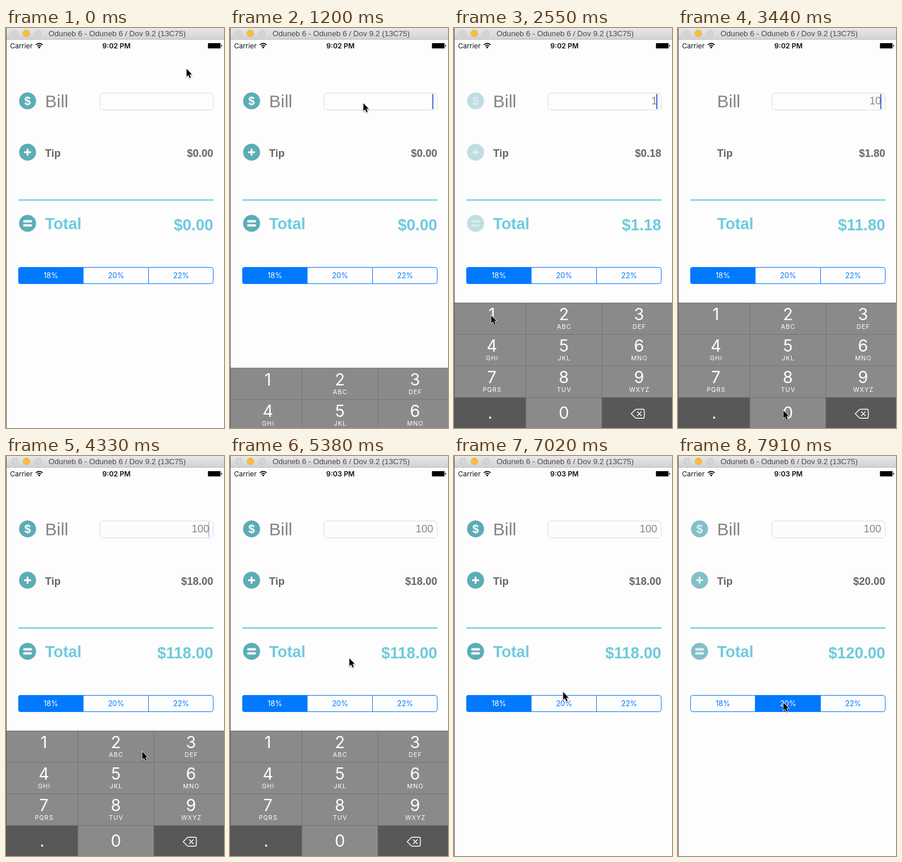
An HTML page with a canvas for the animation above (8 s loop, 374 by 686 pixels).

```html
<!DOCTYPE html>
<html lang="en">
<head>
<meta charset="utf-8">
<title>Tip calculator</title>
<style>
html, body { margin: 0; width: 374px; height: 686px; overflow: hidden; }
canvas { display: block; }
</style>
</head>
<body>
<canvas id="stage" width="374" height="686"></canvas>
<script>
const ctx = document.getElementById('stage').getContext('2d');
const UI = 'Inter, Roboto, sans-serif';
const HELV = '"Liberation Sans", Arial, sans-serif';
const BLUE = '#0079ff', TEAL = '#5dadb6', AQUA = '#6dcbdc';

// The screen refreshes in even steps; every moment below is a step number.
const LOOP = 8000, STEP = 149.2;
const SHOW = 7, HIDE = 37, NEXT_MINUTE = 31;

const home = { x: 309, y: 69 };
const moves = [
  { from: 0, to: 4, x: 228, y: 128 },
  { from: 8, to: 12, x: 95, y: 467 },
  { from: 12, to: 14, x: 63, y: 492 },
  { from: 18, to: 21, x: 180, y: 655 },
  { from: 26, to: 29, x: 233, y: 506 },
  { from: 29, to: 33, x: 204, y: 346 },
  { from: 40, to: 44, x: 284, y: 131 },
  { from: 44, to: 48, x: 180, y: 422 }
];
const edits = [
  { at: -9, bill: '', choice: 0 },
  { at: 16, bill: '1', choice: 0 },
  { at: 23, bill: '10', choice: 0 },
  { at: 26, bill: '100', choice: 0 },
  { at: 51, bill: '100', choice: 1 }
];
const rates = [18, 20, 22];
const letters = ['', 'ABC', 'DEF', 'GHI', 'JKL', 'MNO', 'PQRS', 'TUV', 'WXYZ'];

const clamp = v => Math.max(0, Math.min(1, v));
const easeOut = v => 1 - (1 - clamp(v)) ** 2;

function rect(x, y, w, h, color) {
  ctx.fillStyle = color;
  ctx.fillRect(x, y, w, h);
}

function text(str, x, y, font, color, align = 'left', spacing = 0) {
  ctx.font = font;
  ctx.fillStyle = color;
  ctx.textAlign = align;
  ctx.letterSpacing = spacing + 'px';
  ctx.fillText(str, x, y);
}

function disc(x, y, r, color) {
  ctx.fillStyle = color;
  ctx.beginPath();
  ctx.arc(x, y, r, 0, 7);
  ctx.fill();
}

function roundBox(x, y, w, h, r, color) {
  ctx.strokeStyle = color;
  ctx.lineWidth = 1;
  ctx.beginPath();
  ctx.roundRect(x, y, w, h, r);
  ctx.stroke();
}

function drawChrome(step) {
  const bar = ctx.createLinearGradient(0, 0, 0, 20);
  bar.addColorStop(0, '#e8e8e8');
  bar.addColorStop(1, '#d1d1d1');
  rect(0, 0, 374, 20, bar);
  rect(0, 19, 374, 1, '#bcbcbc');
  rect(0, 0, 1, 686, '#555');
  [15, 35, 55].forEach((x, i) => {
    disc(x, 9, 6, i === 1 ? '#e0a32c' : '#c0c0c0');
    disc(x, 9, 5.4, i === 1 ? '#fdbd2f' : '#d5d5d5');
  });
  text('Oduneb 6 - Oduneb 6 / Dov 9.2 (13C75)', 73, 14, '13.2px ' + HELV, '#4a4a4a');

  text('Carrier', 7, 34.5, '11.8px ' + UI, '#111');
  ctx.strokeStyle = '#111';
  ctx.lineWidth = 1.8;
  [4.5, 8].forEach(r => {
    ctx.beginPath();
    ctx.arc(57, 34.5, r, -Math.PI * 0.75, -Math.PI * 0.25);
    ctx.stroke();
  });
  disc(57, 33.2, 1.5, '#111');
  text(step < NEXT_MINUTE ? '9:02 PM' : '9:03 PM', 189.5, 34.5, '600 12px ' + UI, '#111', 'center');
  rect(346.5, 26, 21.5, 9, '#000');
  rect(369, 29, 1.5, 3, '#111');
}

function drawIcons(alpha) {
  ctx.globalAlpha = alpha;
  [125, 213, 335].forEach(y => disc(37, y, 14.6, TEAL));
  text('$', 37, 132, 'bold 20px ' + HELV, '#fff', 'center');
  rect(31, 211.5, 12, 3, '#fff');
  rect(35.5, 207, 3, 12, '#fff');
  ctx.fillStyle = '#fff';
  ctx.beginPath();
  ctx.roundRect(29.5, 329.5, 15, 4, 1.5);
  ctx.roundRect(29.5, 336.5, 15, 4, 1.5);
  ctx.fill();
  ctx.globalAlpha = 1;
}

// The blink restarts whenever the field is focused or changed.
function caretAlpha(step, editedAt) {
  if (step <= SHOW || step >= HIDE) return 0;
  const age = step - Math.max(SHOW + 1, editedAt);
  return clamp(0.5 + 1.5 * Math.cos((age - 1.3) / 6.5 * 2 * Math.PI));
}

function drawForm(step) {
  const { at, bill, choice } = edits.findLast(e => e.at <= step);
  const tip = bill * rates[choice] / 100;
  const money = v => '$' + v.toFixed(2);

  drawIcons(clamp((step - at) / 2.6));
  text('Bill', 67, 136, '30px ' + HELV, '#858585');
  roundBox(161.5, 111.5, 194, 29, 5, '#dcdcdc');
  text(bill, 348.5, 131, '18px ' + HELV, '#888', 'right');
  ctx.globalAlpha = caretAlpha(step, at);
  rect(347, 113, 2, 26, '#426bd6');
  ctx.globalAlpha = 1;

  text('Tip', 67, 221, 'bold 18px ' + HELV, '#666');
  text(money(tip), 355.5, 221, 'bold 18px ' + HELV, '#666', 'right');
  rect(21, 294, 335, 2, '#6cc6dc');
  text('Total', 67, 345, 'bold 27px ' + HELV, AQUA);
  text(money(+bill + tip), 355.5, 347, 'bold 27px ' + HELV, AQUA, 'right');

  ctx.save();
  ctx.beginPath();
  ctx.roundRect(21, 410, 335, 29, 4);
  ctx.clip();
  rect(21 + choice * 111.5, 410, 112, 29, BLUE);
  rect(132, 410, 1, 29, BLUE);
  rect(244, 410, 1, 29, BLUE);
  ctx.restore();
  roundBox(21.5, 410.5, 334, 28, 4, BLUE);
  rates.forEach((rate, i) =>
    text(rate + '%', 77 + i * 111.8, 429, '12.5px ' + UI, i === choice ? '#fff' : BLUE, 'center'));
}

function drawKeyboard(step) {
  const shown = easeOut((step - SHOW) / 3.58) - easeOut((step - HIDE) / 2.68);
  if (shown <= 0) return;
  const top = 686 - 215 * shown;
  // A key is held during the step before its digit appears.
  const pressed = edits.find(e => e.at === step + 1 && step < HIDE)?.bill.at(-1);
  const edges = [0, 123, 253, 374], centers = [65, 188.5, 317.5];
  rect(1, top, 373, 215, '#747474');
  for (let i = 0; i < 12; i++) {
    const col = i % 3, row = Math.floor(i / 3), y = top + row * 54;
    const digit = i < 9 ? i + 1 : i === 10 ? 0 : '.';
    const dark = digit === '.' || String(digit) === pressed;
    rect(edges[col] + 1, y + 1, edges[col + 1] - edges[col] - 1, 53, dark ? '#585858' : '#8a8a8a');
    if (i < 9) {
      text(digit, centers[col], y + 30, '28px ' + UI, '#fff', 'center');
      text(letters[i], centers[col] + 0.5, y + 45, '10.5px ' + UI, '#fff', 'center', 1);
    } else if (i < 11) {
      text(digit, centers[col] - (i === 9 ? 3 : 0), y + 37, '28px ' + UI, '#fff', 'center');
    }
  }

  ctx.save();
  ctx.translate(304, top + 182);
  ctx.strokeStyle = '#fff';
  ctx.lineWidth = 1.4;
  ctx.lineJoin = ctx.lineCap = 'round';
  ctx.stroke(new Path2D('M0 8.5L7 1.5Q8 .7 9 .7H20Q22.5 .7 22.5 3V14Q22.5 16.3 20 16.3H9Q8 16.3 7 15.5ZM10.5 5L17.5 12M17.5 5L10.5 12'));
  ctx.restore();
}

function drawPointer(step) {
  let { x, y } = home;
  for (const move of moves) {
    const k = easeOut((step - move.from) / (move.to - move.from));
    x += (move.x - x) * k;
    y += (move.y - y) * k;
  }
  const arrow = new Path2D('M.8 1V14.2L3.8 11.4L6.1 16.5L8.2 15.6L6 10.6H10Z');
  ctx.save();
  ctx.translate(x, y);
  ctx.lineWidth = 1.5;
  ctx.strokeStyle = '#fff';
  ctx.shadowColor = 'rgba(0,0,0,.4)';
  ctx.shadowBlur = 2;
  ctx.shadowOffsetY = 1;
  ctx.stroke(arrow);
  ctx.shadowColor = 'transparent';
  ctx.fillStyle = '#000';
  ctx.fill(arrow);
  ctx.restore();
}

const begin = performance.now();
function draw() {
  const step = Math.floor((performance.now() - begin) % LOOP / STEP);
  rect(0, 0, 374, 686, '#fdfdfd');
  drawChrome(step);
  drawForm(step);
  drawKeyboard(step);
  drawPointer(step);
  requestAnimationFrame(draw);
}
draw();
</script>
</body>
</html>
```
